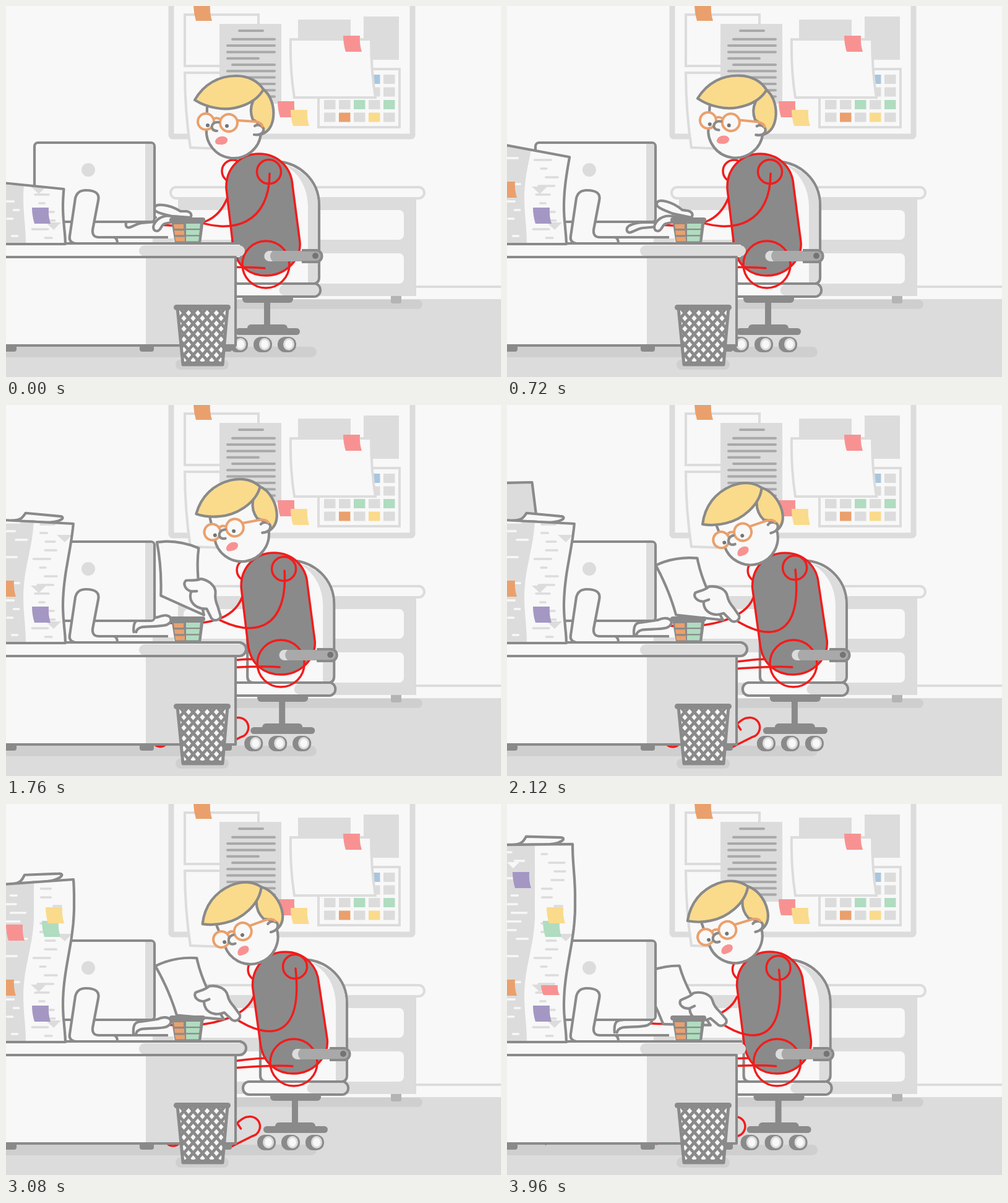
Recreate the animation shown at these times as an HTML page. Size 800 by 600 pixels, loop 4 s.

```html
<!DOCTYPE html>
<html lang="en">
<head>
<meta charset="utf-8">
<title>Office desk</title>
<style>
html, body { margin: 0; width: 100%; height: 100%; overflow: hidden; background: #f8f8f8; }
svg { display: block; width: 100vw; height: 100vh; }
.o { fill: #f8f8f8; stroke: #8a8a8a; stroke-width: 4.2; stroke-linejoin: round; stroke-linecap: round; }
.r { fill: none; stroke: #f21c1c; stroke-width: 3.5; stroke-linecap: round; }
.p { fill: #f8f8f8; stroke: #dcdcdc; stroke-width: 4; }
.l { fill: #dcdcdc; }
.d { fill: #8a8a8a; }
.w { fill: #f8f8f8; }
.g { fill: none; stroke: #eaa06c; stroke-width: 4; }
.n { fill: none; stroke: #8a8a8a; stroke-width: 4.2; }
</style>
</head>
<body>
<svg id="stage" viewBox="0 0 800 600" xmlns="http://www.w3.org/2000/svg"></svg>
<script>
const LOOP = 4000;
const color = { orange: '#eaa06c', yellow: '#fadb8c', pink: '#f89292', green: '#b0dcc0', purple: '#a497c4', blue: '#a9c6de' };

const path = (d, cls, extra = '') => `<path d="${d}" class="${cls}" ${extra}/>`;
const box = (x, y, w, h, cls, rx = 0, extra = '') =>
  `<rect x="${x}" y="${y}" width="${w}" height="${h}" rx="${rx}" class="${cls}" ${extra}/>`;
const disc = (x, y, r, cls, extra = '') => `<circle cx="${x}" cy="${y}" r="${r}" class="${cls}" ${extra}/>`;
const dash = (x1, x2, y, c, w = 4) =>
  `<path d="M${x1},${y}H${x2}" stroke="${c}" stroke-width="${w}" stroke-linecap="round"/>`;
const note = (x, y, c, id = '') =>
  `<path ${id && `id="${id}"`} transform="translate(${x} ${y})" d="M0,0H27Q26,14 30,26H4Q0,13 0,0Z" fill="${color[c]}"/>`;

// Cosine ease from 0 to 1 between a and b.
const ease = (t, a, b) => (1 - Math.cos(Math.PI * Math.min(1, Math.max(0, (t - a) / (b - a))))) / 2;
// Damped jump from 0 to 1.
const settle = u => u < 0 ? 0 : 1 - Math.exp(-u / 70) * Math.cos(u / 50);

function rng(seed) {
  return () => (seed = (seed * 16807) % 2147483647) / 2147483647;
}

// Outer edge of the paper pile and the border of its shaded face.
const rim = y => 106 + 4 * ease(y, 65, 150) - 18 * ease(y, 165, 325) + 4 * ease(y, 325, 390);
const fold = y => 45 - 17 * ease(y, 180, 310) + 4 * ease(y, 310, 385);
const base = { left: 286, right: 296 };
const landings = [
  { time: 380, left: 224, right: 244 },
  { time: 1040, left: 186, right: 192 },
  { time: 2200, left: 130, right: 122 },
  { time: 3480, left: 66, right: 65 }
];

function side(edge, top) {
  let d = '';
  for (let y = top; y < 385; y += 8) d += `L${edge(y).toFixed(1)},${y.toFixed(1)}`;
  return d + `L${edge(385)},385`;
}

function board() {
  let s = box(267, -20, 390, 231, 'w', 2, 'stroke="#dcdcdc" stroke-width="9"');
  s += box(289, 14, 119, 83, 'p') + path('M289,108H350V231L298,229Q289,170 289,108Z', 'p');
  s += box(345, 29, 100, 129, 'l') + dash(377, 415, 40, '#a9a9a9');
  for (let i = 1; i < 11; i++) s += dash(i % 4 === 1 ? 366 : 358, i === 4 ? 408 : 434, 43.5 + i * 10.3, '#a9a9a9');
  s += box(472, 22, 85, 40, 'l') + box(578, 17, 57, 70, 'l') + box(505, 102, 131, 94, 'p');
  const tint = { 3: 'blue', 12: 'green', 14: 'green', 16: 'orange', 18: 'yellow' };
  for (let i = 0; i < 20; i++)
    s += box(514 + i % 5 * 24, 111 + Math.floor(i / 5) * 20.5, 18.5, 15, '', 0, `fill="${color[tint[i]] || '#dcdcdc'}"`);
  s += path('M460,54H590Q590,105 597,148H466Q459,105 460,54Z', 'p');
  return s + note(303, -2, 'orange') + note(545, 48, 'pink') + note(439, 154, 'pink') + note(460, 168, 'yellow');
}

function room() {
  return box(0, 474, 800, 126, 'l') + dash(660, 800, 454, '#dcdcdc')
    + box(360, 475, 313, 15, '', 7.5, 'fill="#cfcfcf"') + box(-20, 551, 522, 17, '', 8.5, 'fill="#cfcfcf"')
    + box(622, 465, 17, 16, '', 3, 'fill="#b4b4b4"') + box(278, 305, 385, 164, 'l')
    + box(287, 330, 356, 48, 'w', 8) + box(287, 400, 356, 49, 'w', 8) + box(266, 293, 410, 18, 'p', 9);
}

function chair() {
  let s = box(382, 466, 82, 14, 'd', 6) + box(417, 476, 10, 44, 'd') + box(390, 515, 65, 13, 'd', 6) + box(371, 521, 104, 11, 'd', 5.5);
  for (let x = 376; x < 460; x += 39)
    s += box(x - 15, 535, 30, 25, 'd', 12) + `<ellipse cx="${x + 3}" cy="547" rx="7.5" ry="8.5" fill="#f8f8f8" stroke="#dcdcdc" stroke-width="3"/>`;
  s += path('M366,320C366,276 394,251 432,251C474,251 506,282 506,322V439Q506,449 496,449H376Q366,449 366,439Z', 'o');
  s += path('M448,256C482,264 504,288 504,322V437Q504,447 494,447H488V325C488,296 475,270 448,256Z', 'l');
  s += box(338, 449, 170, 21, 'o', 10);
  return s + path('M450,451H497A8.5,8.5 0 0 1 497,468H450A8.5,8.5 0 0 1 450,451Z', 'l');
}

function armrest() {
  return box(417, 396, 93, 17, '', 8.5, 'fill="#a9a9a9"')
    + path('M431,396H426A8.5,8.5 0 0 0 426,413H431Q423,404 431,396Z', 'l')
    + path('M478,395H501A9.5,9.5 0 0 1 501,414H478', 'n') + disc(500, 404, 5, '', 'fill="#747474"');
}

// Drawn around the middle of the face.
function head() {
  const blond = `style="fill:${color.yellow}"`, lens = 'style="fill:#f8f8f8"', dark = 'fill="#747474"';
  return path('M-43,-34L-44,0A44,44 0 0 0 44,8L30,-50', 'o')
    + path('M48,-63C60,-54 66,-35 64,-18C62,-2 54,6 46,9C46,0 42,-9 31,-14C22,-35 34,-55 48,-63Z', 'o', blond)
    + path('M-63,-46C-48,-72 -24,-85 4,-85C24,-85 40,-76 48,-63C34,-38 -2,-28 -28,-33C-42,-35 -55,-41 -63,-46Z', 'o', blond)
    + path('M34,-4C40,-8 50,-3 48,4C46,10 40,11 33,10', 'o')
    + path('M6,-13L36,-11Q46,-9 47,-2', 'g') + disc(-45, -11, 13, 'g', lens) + disc(-8, -9, 14, 'g', lens)
    + path('M-33,-15Q-27,-19 -21,-14', 'g') + path('M-24,-10C-37,-12 -40,4 -27,4', 'o')
    + disc(-42, -5, 3, '', dark) + disc(-11, -4, 3, '', dark)
    + path('M-30,21C-28,12 -14,10 -10,17C-9,24 -16,27 -22,26C-27,26 -30,25 -30,21Z', '', `fill="${color.pink}"`);
}

function monitor() {
  return box(46, 221, 194, 128, 'o', 6) + path('M225,223H235Q238,223 238,227V343Q238,347 235,347H225Z', 'l')
    + disc(133, 265, 11, 'l') + path('M150,374H262', 'n') + box(237, 376, 34, 7, 'l')
    + path('M112,384Q101,382 103,372L112,311Q115,298 129,298Q153,298 149,315L140,362Q139,374 150,374H174Q180,375 180,384Z', 'o');
}

function cup() {
  let s = path('M267,346H320L315,384H273Z', 'd') + box(264, 342, 58, 8, 'd', 4);
  for (let i = 0; i < 3; i++) {
    const y = 353 + i * 10.3;
    s += path(`M${271 + i},${y}h16v7h-15z`, '', `fill="${color.orange}"`) + path(`M291,${y - 1}h${23 - i}l-1,8h${i - 22}z`, '', `fill="${color.green}"`);
  }
  return s;
}

function desk() {
  let s = box(-10, 386, 388, 20, 'w') + box(215, 387, 171, 18, 'l', 9);
  for (const x of [-6, 216, 342]) s += box(x, 545, 23, 14, 'd', 4);
  s += box(-10, 406, 381, 143, 'o') + box(226, 408, 143, 139, 'l');
  return s + path('M-5,384H380', 'n') + path('M374,384H377A11,11 0 0 1 377,406H370', 'n', 'id="deskEnd"');
}

function basket() {
  return box(274, 572, 86, 16, '', 8, 'fill="#cfcfcf"')
    + path('M277,488H358L350,580H286Z', 'o', 'style="fill:url(#mesh);stroke-width:5"')
    + box(284, 575, 68, 7, 'd', 3) + box(271, 483, 92, 9, 'd', 4.5);
}

function pileMarks() {
  const rnd = rng(77);
  let s = '';
  for (let y = 78; y < 380; y += 14) {
    const f = fold(y), r = rim(y);
    const a = rnd() * 24 - 8, b = f + 8 + rnd() * 24;
    if (rnd() < .7) s += dash(a, Math.min(f - 8, a + 8 + rnd() * 22), y, '#f8f8f8', 3.6);
    s += dash(b, Math.min(r - 14, b + 8 + rnd() * 22), y + 3, '#dcdcdc', 3.6);
  }
  for (const [x, y] of [[64, 350], [40, 292], [82, 210]]) s += path(`M${x},${y}h25l-12,12z`, 'l');
  return s + path('M0,94h20l-10,10z', 'w');
}

const stage = document.getElementById('stage');
stage.innerHTML = `<defs>
  <pattern id="mesh" x="310" y="488" width="15" height="17" patternUnits="userSpaceOnUse">
    <rect width="15" height="17" fill="#f8f8f8"/>
    <path d="M-7.5,-8.5L22.5,25.5M22.5,-8.5L-7.5,25.5" stroke="#8a8a8a" stroke-width="5"/></pattern>
  <clipPath id="pileClip"><path id="pileMask"/></clipPath></defs>`
  + board() + room()
  + `<g id="chair">${chair()}<g id="torso">${disc(367, 267, 18, 'r', 'style="fill:#f8f8f8"')}`
  + path('M356,295C355,262 379,239 409,239C438,239 461,260 463,290L475,382C477,412 450,436 420,436C394,436 371,420 367,388Z', 'r', 'style="fill:#8a8a8a"')
  + `</g>${disc(420, 418, 38, 'r')}${armrest()}</g>`
  + path('', 'r', 'id="thighs"') + path('', 'r', 'id="feet"')
  + `<g id="body">${path('', 'r', 'id="farArm"')}`
  + path('M-126,-86Q-96,-101 -59,-98Q-51,-55 -17,2L-93,-6Q-105,-48 -126,-86Z', 'o', 'id="paper"')
  + path('M-54,15C-55,1 -52,-5 -42,-5L-15,-9C4,-18 14,-4 0,3C-10,7 -28,5 -41,7Q-49,9 -50,15', 'o', 'id="farHold"')
  + path('', 'r', 'id="arm"') + disc(0, 0, 19.5, 'r', 'id="shoulder"')
  + path('M-48,-28C-58,-27 -66,-35 -62,-42C-56,-45 -46,-46 -40,-52C-26,-54 -12,-48 -10,-36C-9,-30 -7,-26 0,-18L9,-5C11,2 2,7 -4,3L-16,-9C-26,-5 -38,-6 -45,-15C-48,-20 -49,-24 -48,-28ZM-48,-28L-40,-31', 'o', 'id="hand"')
  + `<g id="head"><g transform="translate(368 198)">${head()}</g></g></g>`
  + `<g id="typing">${path('M242,350H222C212,350 204,352 198,355C191,359 193,368 200,366C207,364 211,360 219,359L242,357', 'o', 'id="farType"')}`
  + path('M298,342L268,340C262,338 244,336 240,330C238,322 246,321 254,322C264,323 274,327 282,332H292C299,333 301,338 298,342Z', 'o', 'id="fingers"')
  + path('M290,342L268,340C255,338 246,343 241,350C236,357 238,364 244,364C251,363 250,354 257,352L280,347', 'o') + '</g>'
  + monitor() + path('M57,549L63,552L66,549', '', 'id="glint" fill="#3f72c8"')
  + desk() + cup() + basket()
  + landings.map((_, i) => path('M-60,2L40,0L46,48V62H-60Z', 'o', `id="sheet${i}" style="fill:#dcdcdc"`)).join('')
  + path('M10,0C22,0 26,-4 31,-13L86,-11C92,-11 93,-8 88,-5C78,1 60,1 45,0L25,1', 'o', 'id="curl"')
  + `<g clip-path="url(#pileClip)">${box(-5, 20, 130, 370, 'w')}`
  + path('M-5,40' + side(fold, 40) + 'H-5Z', 'l') + pileMarks()
  + note(42, 326, 'purple') + `<g id="layer0">${note(-14, 284, 'orange')}</g>`
  + `<g id="layer2">${note(58, 189, 'green')}${note(64, 167, 'yellow')}${note(0, 195, 'pink', 'loose')}</g>`
  + `<g id="layer3">${note(9, 110, 'purple')}</g></g>`
  + path('', 'o', 'id="pile" style="fill:none"');

const el = {};
stage.querySelectorAll('[id]').forEach(n => el[n.id] = n);
const set = (id, name, value) => el[id].setAttribute(name, value);
const show = (id, on) => set(id, 'visibility', on ? 'visible' : 'hidden');
const move = (id, x, y, rest = '') => set(id, 'transform', `translate(${x} ${y}) ${rest}`);
// Curve from one joint to another, bent by the offsets a and b.
const limb = ([x, y], [ax, ay], [u, v], [bx, by]) =>
  `M${x},${y}C${x + ax},${y + ay} ${u + bx},${v + by} ${u},${v}`;

function drawPerson(t) {
  const nod = ease(t, 960, 1350), grab = ease(t, 1400, 1760);
  const read = ease(t, 1700, 2200), back = ease(t, 3610, 4210);
  const off = 45 * (ease(t, 1200, 2270) - back);
  move('chair', off, 0);
  move('body', off, 0);
  set('torso', 'transform', `rotate(${-1.1 * read * (1 - back)} 420 420)`);
  const bob = 1.7 * Math.sin(t * Math.PI / 1440) * (1 - nod);
  set('head', 'transform', `rotate(${bob - 14 * nod - 9.5 * read + 4 * back} 390 251)`);

  const shoulder = [426 - 3 * read, 271 - 3 * grab - 2 * read + 3 * back];
  const wrist = [292 + 20 * grab + 12 * read + 8 * back, 342 + grab + 3 * read + 13 * back];
  const farWrist = [250 - 13 * grab - 22 * read - 6 * back, 354 - 2 * grab + 5 * read - 4 * back];
  set('arm', 'd', limb(shoulder, [5 * grab + 7 * read, 77 + 13 * grab + 24 * read], wrist, [78 - 10 * grab - 11 * read, 34 + 4 * grab]));
  set('farArm', 'd', limb([357 - 2 * read, 312], [-14, 34], farWrist, [67, 6]));
  move('shoulder', shoulder[0] - 1, shoulder[1] - 3);

  const busy = t < 1440, turn = `rotate(${4 + 15 * grab - 20 * read - 6 * back})`;
  show('typing', busy);
  for (const id of ['hand', 'paper', 'farHold']) show(id, !busy);
  move('hand', ...wrist, turn);
  move('paper', wrist[0] - 90 * (1 - grab), wrist[1], turn);
  move('farHold', ...farWrist);
  set('fingers', 'transform', `rotate(${8 * Math.max(0, Math.sin(t * Math.PI / 160))} 298 340)`);
  move('farType', 0, -8 * Math.max(0, Math.cos(t * Math.PI / 240)));

  set('thighs', 'd', `M${418 + off},424Q${385 + off},421 330,${423 + off * .16}M${374 + off},411Q${355 + off},411 330,${412 + off * .2}`);
  const heel = 350 + .9 * off, toe = 225 + off, sole = 530 + Math.min(10, off * .4);
  set('feet', 'd', `M${heel - 11},525L${heel - 17},516Q${heel - 6},506 ${heel},506A16,16 0 0 1 ${heel + 8},537L${heel - 32},557`
    + `M${toe - 13},${sole}A13,13 0 0 0 ${toe + 13},${sole}`);
  show('deskEnd', off > 18);
  show('glint', t > 3900);
}

function drawPile(t) {
  let { left, right } = base, from = base;
  landings.forEach((land, i) => {
    const age = t - land.time;
    left += (land.left - from.left) * settle(age);
    right += (land.right - from.right) * settle(age);
    from = land;
    show('sheet' + i, age > -240 && age < 60);
    move('sheet' + i, (age + 80) / 2, land.right + 3);
    if (el['layer' + i]) show('layer' + i, age > 0);
  });
  const d = `M-5,${left}` + side(rim, right);
  set('pile', 'd', d + 'H-5');
  set('pileMask', 'd', d + 'H-5Z');
  show('curl', t > landings[1].time + 60);
  move('curl', 0, left, `rotate(${Math.atan2(right - left, 108) * 180 / Math.PI})`);
  const fall = ease(t, 3400, 3960);
  move('loose', 55 * fall + 8 * Math.sin(fall * Math.PI * 2), 195 + 98 * fall, `scale(1 ${1 - .38 * fall})`);
}

function draw(t) {
  drawPerson(t);
  drawPile(t);
}

const start = performance.now();
function frame(now) {
  draw(Math.max(0, now - start) % LOOP);
  requestAnimationFrame(frame);
}
draw(0);
requestAnimationFrame(frame);
</script>
</body>
</html>
```
